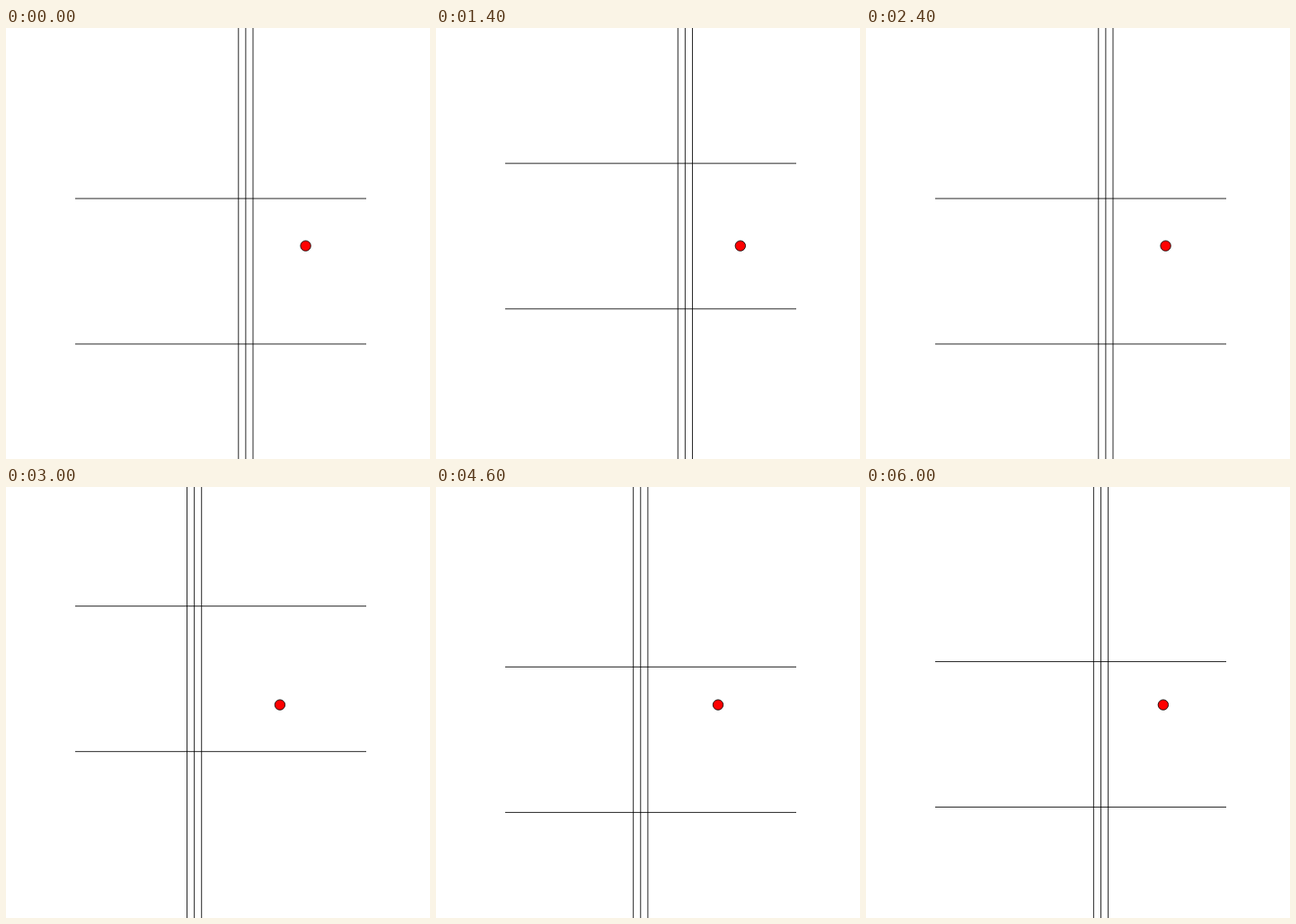
An HTML page that plays this animation: 472x480 px, repeating every 6070 ms.

```html
<!DOCTYPE html>
<html lang="en">
<head>
<meta charset="utf-8">
<title>Circling lines</title>
<style>
  html, body { margin: 0; width: 100%; height: 100%; overflow: hidden; background: #fff; }
  svg { display: block; }
</style>
</head>
<body>
<svg width="472" height="480" viewBox="0 0 472 480">
  <g stroke="#000" stroke-width="0.85">
    <path id="across"/>
    <path id="down"/>
  </g>
  <circle id="dot" cy="242.6" r="5.7" fill="#f00" stroke="#000" stroke-width="0.85"/>
</svg>
<script>
const LOOP = 6070;
const LAST_STEP = 89.5; // the closing step is only half as long
const UNIT = 81;
const RADIUS = UNIT / 2;
const CX = 238.25, CY = 161.3;
const [across, down, dot] = ['across', 'down', 'dot'].map(id => document.getElementById(id));

// Fifteen steps a second, on a clock of hundredths
function stepAt(ms) {
  const ticks = Math.floor((ms % LOOP) / 10);
  return Math.min(Math.floor((ticks + 0.5) * 3 / 20), LAST_STEP);
}

function draw(ms) {
  const angle = (45 - 20 * stepAt(ms)) * Math.PI / 180;
  const dx = RADIUS * Math.cos(angle);
  const x = CX + dx;
  const y = CY + RADIUS * Math.sin(angle);
  across.setAttribute('d', [0, 2].map(n => `M77 ${y + n * UNIT}H401`).join(''));
  down.setAttribute('d', [-0.1, 0, 0.1].map(n => `M${x + n * UNIT} 0V480`).join(''));
  dot.setAttribute('cx', CX + UNIT + dx / 2);
}

const start = performance.now();
function tick() {
  draw(performance.now() - start);
  requestAnimationFrame(tick);
}
draw(0);
requestAnimationFrame(tick);
</script>
</body>
</html>
```
